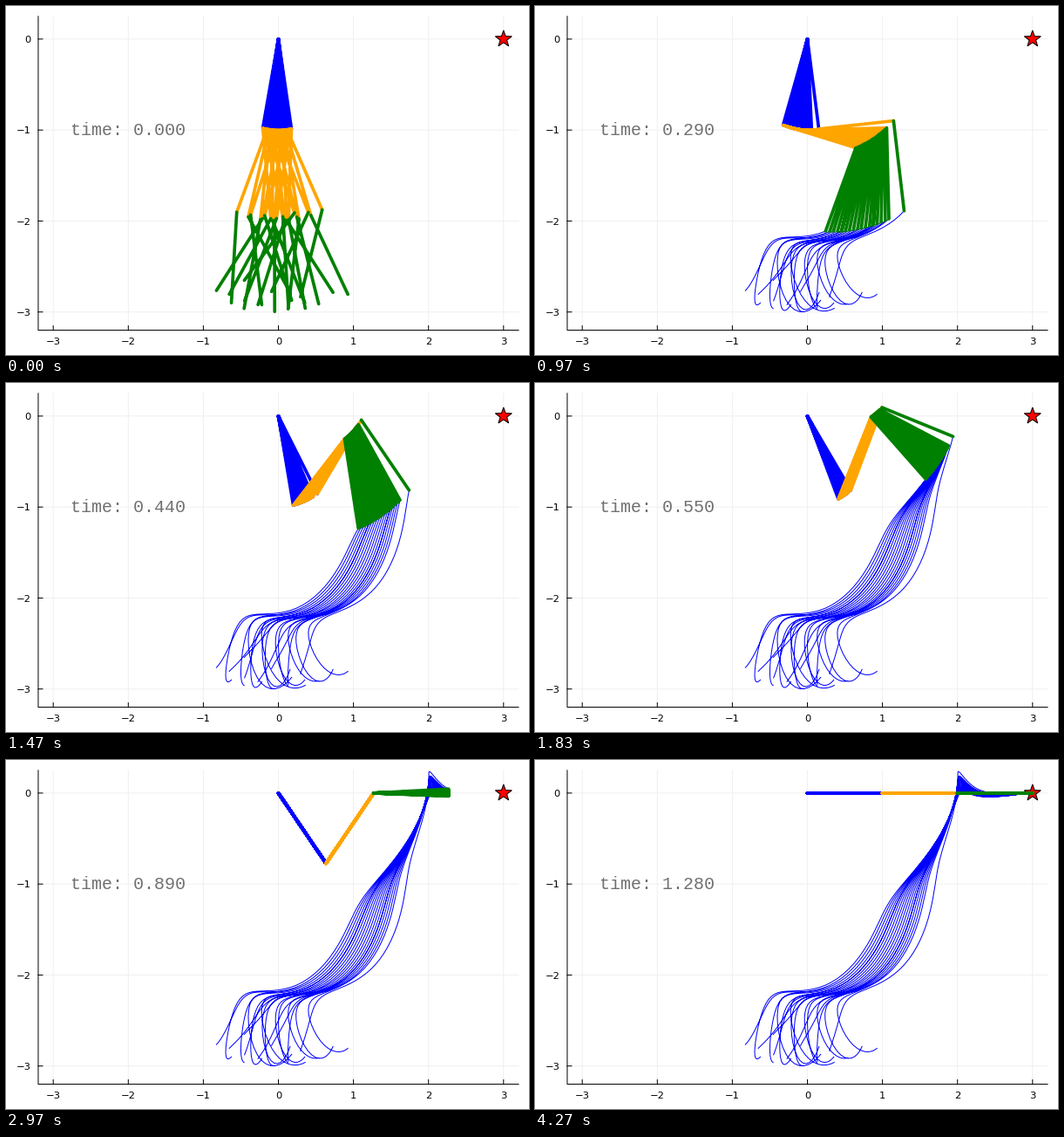
Write a matplotlib script that moves like this. It is 600 by 400 pixels and loops after 4.31 s.

```python
import numpy as np
import matplotlib.pyplot as plt
from matplotlib.animation import FuncAnimation

W, H, DPI = 600, 400, 100
PX = 72 / DPI
X0, Y0, SX, SY = 312.5, 37.9, 86.1, 104.27
ARMS, STEPS = 20, 129
TICK_MS, TICKS = 10, 431

# time, then mean angle of each link in degrees from straight down
POSES = np.array([
    (0, -1, 2, -2),
    (.14, -11, 46, -38),
    (.29, -7, 84, -10),
    (.44, 20, 140, 23),
    (.68, 30, 150, 92),
    (.89, 39.4, 140.6, 90),
    (1.12, 74, 106, 90),
    (1.28, 90, 90, 90),
])


def spline(keys, y, x):
    """Cubic spline through (keys, y), flat at both ends."""
    n, h = len(keys), np.diff(keys)
    rate = np.diff(y, axis=0) / h[:, None]
    a, b = np.eye(n), np.zeros_like(y)
    for i in range(1, n - 1):
        a[i, i - 1:i + 2] = 1 / h[i - 1], 2 / h[i - 1] + 2 / h[i], 1 / h[i]
        b[i] = 3 * (rate[i - 1] / h[i - 1] + rate[i] / h[i])
    m = np.linalg.solve(a, b)
    k = np.clip(np.searchsorted(keys, x, "right") - 1, 0, n - 2)
    s, dt = ((x - keys[k]) / h[k])[:, None], h[k][:, None]
    return ((1 + 2 * s) * (1 - s) ** 2 * y[k] + s * s * (3 - 2 * s) * y[k + 1]
            + dt * s * (1 - s) * ((1 - s) * m[k] - s * m[k + 1]))


def spread(stride, start):
    """Evenly spaced values in [-1, 1], dealt to the arms in strides."""
    return np.linspace(-1, 1, ARMS)[(stride * np.arange(ARMS) + start) % ARMS]


def solve_arms():
    """Joint positions in pixels, shaped (step, arm, joint, xy)."""
    t = np.arange(STEPS) / 100
    mean = spline(POSES[:, 0], POSES[:, 1:], t)[:, None]
    t = t[:, None, None]
    rest = np.stack([11 * spread(7, 3), 26 * spread(1, 0), 40 * spread(3, 9)], axis=-1)
    swing = 22 * spread(1, 0) + 9 * spread(9, 8)
    # the resting scatter dies out and turns into a shared swing
    fade = np.exp(-(t / .12) ** 2)
    hold = np.exp(-(t / np.array([.55, .42, .75])) ** 4)
    gain = np.array([.55, .45, .6])
    ang = np.radians(mean + rest * fade + swing[:, None] * gain * (hold - fade))
    joints = np.zeros((STEPS, ARMS, 4, 2))
    joints[:, :, 1:, 0] = np.cumsum(np.sin(ang), axis=2) * SX
    joints[:, :, 1:, 1] = np.cumsum(np.cos(ang), axis=2) * SY
    return joints + (X0, Y0)


def joined(paths):
    """Put many polylines (n, points, 2) into one, split by gaps."""
    gap = np.full((len(paths), 1, 2), np.nan)
    return np.concatenate([paths, gap], axis=1).reshape(-1, 2).T


fig = plt.figure(figsize=(W / DPI, H / DPI), dpi=DPI, facecolor="white")
ax = fig.add_axes((0, 0, 1, 1))
ax.set(xlim=(0, W), ylim=(H, 0))
ax.axis("off")


def line(x, y, color, width, **kw):
    return ax.plot(x, y, color=color, lw=width * PX, snap=False, **kw)[0]


LEFT, RIGHT = X0 - 3.2 * SX, X0 + 3.2 * SX
TOP, BOTTOM = Y0 - .25 * SY, Y0 + 3.2 * SY
label = dict(family="DejaVu Sans", size=11.5 * PX, color="black", va="baseline")
for v in range(-3, 4):
    x = X0 + v * SX
    line([x, x], [TOP, BOTTOM], "#f0f0f0", 1)
    line([x, x], [BOTTOM, BOTTOM - 5], "black", 1)
    ax.text(x, 387.5, f"{v}".replace("-", "−"), ha="center", **label)
for v in range(-3, 1):
    y = Y0 - v * SY
    line([LEFT, RIGHT], [y, y], "#f0f0f0", 1)
    line([LEFT, LEFT + 5], [y, y], "black", 1)
    ax.text(29, y + 4.3, f"{v}".replace("-", "−"), ha="right", **label)
line([LEFT, LEFT, RIGHT], [TOP, BOTTOM, BOTTOM], "black", 1)

turn = np.arange(10) * np.pi / 5
radius = np.where(np.arange(10) % 2, 4, 10)
ax.fill(X0 + 3 * SX + radius * np.sin(turn), Y0 - radius * np.cos(turn),
        fc="red", ec="black", lw=PX, joinstyle="miter", zorder=2)

joints = solve_arms()
trace = line([], [], "blue", 1)
links = [line([], [], color, 3.7, solid_capstyle="round")
         for color in ("blue", "orange", "green")]
clock = ax.text(73.5, 148.5, "", family="Liberation Mono", size=20 * PX,
                color="#707070", va="baseline")


def update(tick):
    step = min(int((tick + .5) * .3), STEPS - 1)
    trace.set_data(*joined(joints[:step + 1, :, 3].swapaxes(0, 1)))
    for i, link in enumerate(links):
        link.set_data(*joined(joints[step, :, i:i + 2]))
    clock.set_text(f"time: {step / 100:.3f}")
    return [trace, *links, clock]


anim = FuncAnimation(fig, update, frames=TICKS, interval=TICK_MS,
                     repeat=True, repeat_delay=0, init_func=lambda: update(0))
plt.show()
```
